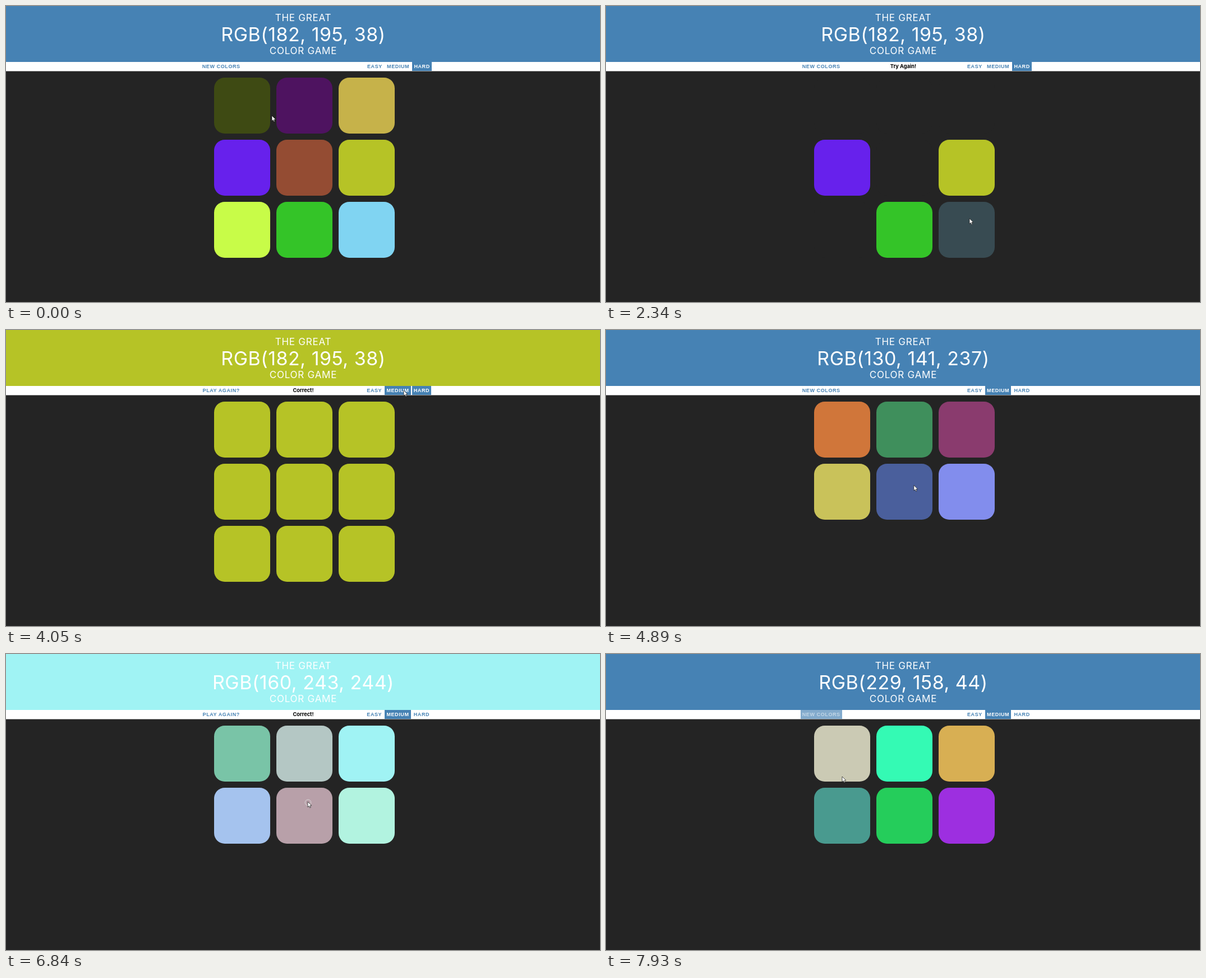
These frames come from a looping animation (1059 px wide and 529 px high, 8000 ms). An HTML page:

```html
<!DOCTYPE html>
<html lang="en">
<head>
<meta charset="utf-8">
<title>Color Game</title>
<style>
  html, body { margin: 0; width: 100%; height: 100%; overflow: hidden; background: #242424; }
  svg { position: absolute; left: 0; top: 0; }
  svg text { font: 17px Inter, sans-serif; fill: #fff; text-anchor: middle; letter-spacing: .75px; }
  #code { font-size: 34px; letter-spacing: .5px; }
  nav { position: absolute; left: 0; top: 100px; font: bold 9px/16.4px "Liberation Sans", Arial, sans-serif; }
  nav > * { position: absolute; top: 0; white-space: nowrap; }
  nav b { padding: 0 3px; letter-spacing: .6px; }
  #reset { left: 383.7px; transform: translateX(-50%); }
  #message { left: 530px; transform: translateX(-50%); font: 700 9.2px/16.4px Inter, sans-serif; color: #000; }
  #modes { display: flex; gap: 2.2px; }
</style>
</head>
<body>
<svg width="1059" height="529">
  <rect id="header" width="1059" height="100"/>
  <rect y="100" width="1059" height="16.5" fill="#fff"/>
  <text x="530" y="27.4">THE GREAT</text>
  <text x="530" y="63.4" id="code"></text>
  <text x="530" y="85.6">COLOR GAME</text>
  <g id="board"></g>
</svg>
<nav>
  <b id="reset"></b>
  <span id="message"></span>
  <div id="modes"><b>EASY</b><b>MEDIUM</b><b>HARD</b></div>
</nav>
<svg width="1059" height="529">
  <g id="cursor">
    <circle id="ring" cx=".5" cy="1.5" r="5.3" fill="none" stroke="#ddd" stroke-width=".9"/>
    <path d="M0 0V9.6L2.2 7.6L3.7 10.9L5.3 10.2L3.9 7L6.9 6.8Z" fill="#fff" stroke="#111" stroke-width=".7"/>
  </g>
</svg>
<script>
const LOOP = 8000, FADE = 400, RING = 130, PITCH = 111;
const $ = id => document.getElementById(id);
const rgb = hex => [0, 2, 4].map(i => parseInt(hex.substr(i, 2), 16));
const css = c => `rgb(${c.map(Math.round)})`;
const mix = (a, b, p) => a.map((v, i) => v + (b[i] - v) * p);
const STEEL = rgb('4682b4'), WHITE = rgb('ffffff'), DARK = rgb('242424');

const rounds = [
  [5, '3e4a13 4e1360 c6b24a 6721ec 944c33 b6c326 c8fc48 34c428 80d4f2'],
  [5, 'd0763a 3f8f5c 8a3b6e c9c25a 4a5f9c 828ded'],
  [2, '509358 c89992 a0f3f4 aa91e8 d04b5c c4f3cc'],
  [2, 'd5c0a4 1afca4 e59e2c 348476 07c436 9c00db']
].map(([key, list]) => ({ key, colors: list.split(' ').map(rgb) }));

const buttons = { medium: [709, 108], reset: [390, 108] };
const column = i => i % 3 * PITCH;
const row = i => Math.floor(i / 3) * PITCH;

// Where the cursor is when: a square or button is clicked, a point is only passed
const visits = [
  [0, [474, 196]], [300, 0], [650, 1], [1140, 2], [1535, 4], [1820, 6], [2150, 8], [2832, 5],
  [2950, [540, 379]], [3490, [700, 134]], [4050, buttons.medium], [4320, 'medium'],
  [5000, 4], [5440, 5], [5870, [665, 135]], [6180, 'medium'],
  [6722, 2], [6840, [538, 264]], [7280, buttons.reset], [7730, 'reset'], [7930, [421, 219]]
].map(([at, spot]) => ({
  at, spot,
  click: !Array.isArray(spot),
  point: Array.isArray(spot) ? spot : buttons[spot] || [426 + column(spot), 179 + row(spot)]
}));

// The CSS "ease" curve
function ease(x) {
  if (x <= 0) return 0;
  if (x >= 1) return 1;
  let lo = 0, hi = 1, s;
  for (let i = 0; i < 20; i++) {
    s = (lo + hi) / 2;
    if (.75 * s * (1 - s) + s ** 3 < x) lo = s; else hi = s;
  }
  return .3 * s * (1 - s) ** 2 + 3 * (1 - s) * s * s + s ** 3;
}
const fade = (t, start) => ease((t - start) / FADE);

const squares = rounds[0].colors.map((color, i) => {
  const el = document.createElementNS('http://www.w3.org/2000/svg', 'rect');
  const attrs = { x: 371 + column(i), y: 128 + row(i), width: 100, height: 100, rx: 19 };
  for (const k in attrs) el.setAttribute(k, attrs[k]);
  $('board').append(el);
  return el;
});

// Replays every click up to time t
function play(t) {
  let level = 0, message = '', won = false, round = rounds[0], shown = round.colors;
  for (const { at, spot, click } of visits) {
    if (!click || at > t) continue;
    let goal = shown;
    if (spot in buttons) {
      round = rounds[++level];
      goal = round.colors;
      message = '';
      won = false;
    } else if (spot === round.key) {
      goal = shown.map(() => round.colors[spot]);
      message = 'Correct!';
      won = true;
    } else {
      goal = shown.map((c, i) => i === spot ? DARK : c);
      message = 'Try Again!';
    }
    shown = goal.map((c, i) => mix(shown[i], c, fade(t, at)));
  }
  return { answer: round.colors[round.key], message, won, shown };
}

function paintButton(el, on) {
  el.style.background = css(mix(WHITE, STEEL, on));
  el.style.color = css(mix(STEEL, WHITE, on));
}

function moveCursor(t) {
  const next = visits.find(v => v.at > t) || visits.at(-1);
  const last = visits.findLast(v => v.at <= t);
  const p = Math.min(1, (t - last.at) / (next.at - last.at || 1));
  const [x, y] = mix(last.point, next.point, p * p * (3 - 2 * p));
  $('cursor').setAttribute('transform', `translate(${x} ${y})`);
  $('ring').style.display = visits.some(v => v.click && t >= v.at && t < v.at + RING) ? '' : 'none';
}

function draw(t) {
  const { answer, message, won, shown } = play(t);
  $('header').style.fill = css(won ? answer : STEEL);
  $('code').textContent = `RGB(${answer.join(', ')})`;
  $('reset').textContent = won ? 'PLAY AGAIN?' : 'NEW COLORS';
  $('message').textContent = message;
  $('modes').style.left = (won ? 640.3 : 641) + 'px';

  const [easy, medium, hard] = $('modes').children;
  paintButton(easy, 0);
  paintButton(medium, fade(t, 3540));
  paintButton(hard, 1 - fade(t, 4320));
  paintButton($('reset'), fade(t, 7270) - fade(t, 7845));

  squares.forEach((el, i) => {
    el.style.fill = shown[i] ? css(shown[i]) : 'none';
  });
  moveCursor(t);
}

function tick() {
  draw(performance.now() % LOOP);
  requestAnimationFrame(tick);
}
tick();
</script>
</body>
</html>
```
